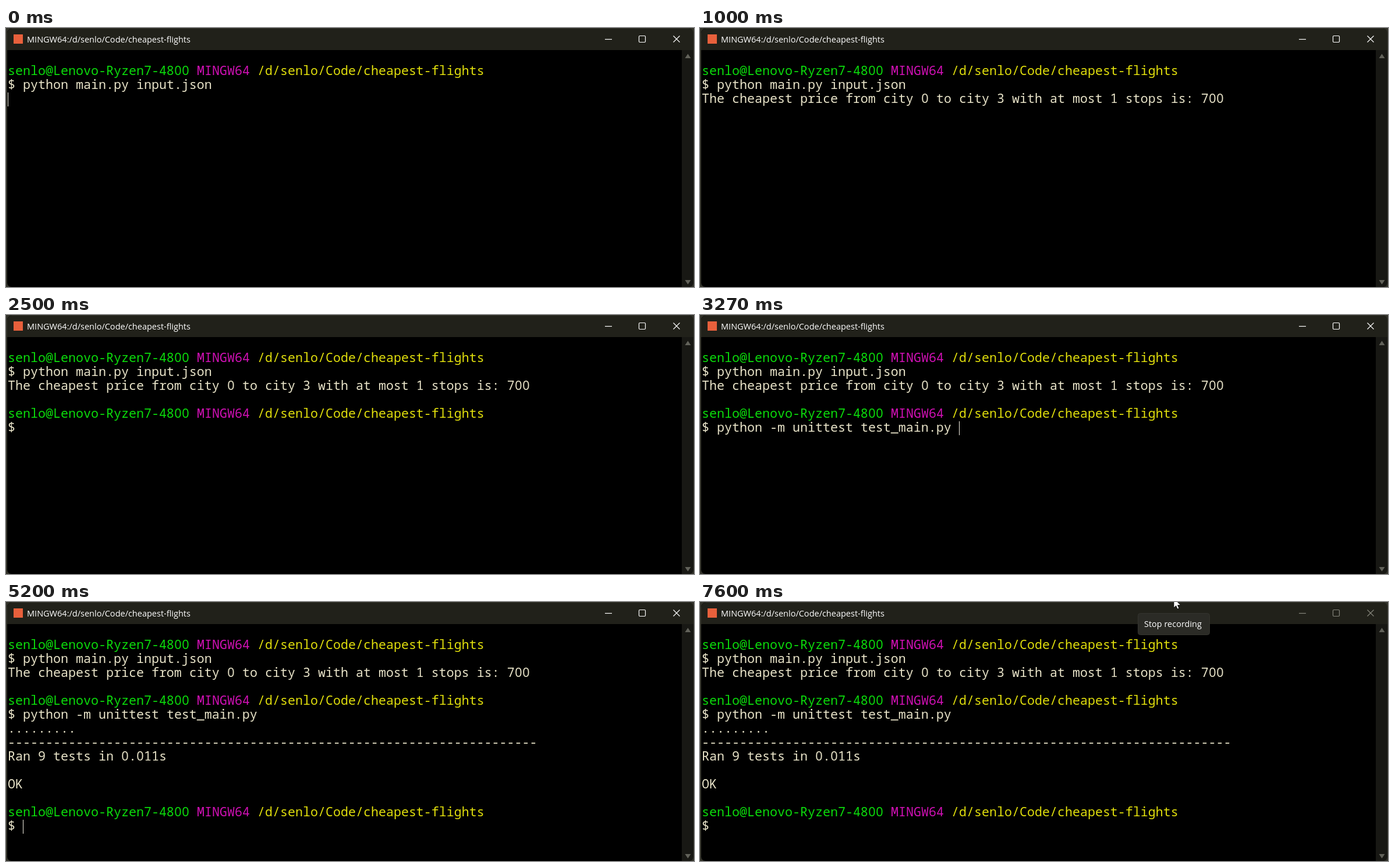
An HTML page that plays this animation: 1182x446 px, repeating every 7.96 s.

```html
<!DOCTYPE html>
<html lang="en">
<head>
<meta charset="utf-8">
<title>Terminal</title>
<style>
html, body { margin: 0; width: 100%; height: 100%; overflow: hidden; background: #000; }
svg { display: block; }
text { white-space: pre; }
.term { font: 500 21.667px "Noto Sans Mono", monospace; }
.zero { font-family: "Noto Sans", sans-serif; }
.ui { font: 14.5px "Open Sans", sans-serif; fill: #fff; }
</style>
</head>
<body>
<svg width="1182" height="446" viewBox="0 0 1182 446">
  <rect width="1182" height="446" fill="#32322a"/>
  <rect x="1.5" y="0.5" width="1179.5" height="446" rx="8" fill="#000" stroke="#35352c"/>
  <path d="M2 38V9a8 8 0 0 1 8-8H1173a8 8 0 0 1 8 8V38Z" fill="#21211a"/>
  <path d="M1161 38H1181V438a8 8 0 0 1-8 8H1161Z" fill="#181814"/>
  <path d="M1166.5 52H1176.5L1171.5 44.5ZM1166.5 434H1176.5L1171.5 441.5Z" fill="#62625a"/>
  <rect x="13" y="11" width="16" height="16" fill="#e8603c"/>
  <text class="ui" x="36" y="25">MINGW64:/d/senlo/Code/cheapest-flights</text>
  <g id="controls" fill="none" stroke-width="1.2">
    <path d="M1029 19.5H1041"/>
    <rect x="1087.5" y="13.5" width="11" height="11" rx="1.5"/>
    <path d="M1146.5 13.5L1157.5 24.5M1157.5 13.5L1146.5 24.5"/>
  </g>
  <g id="screen" class="term"></g>
  <rect id="caret" width="1" height="24" fill="#f4f0e4"/>
  <g id="tip">
    <rect x="752.5" y="19.5" width="123" height="37" rx="4" fill="#2b2b26" stroke="#34342e"/>
    <text class="ui" x="763" y="43">Stop recording</text>
  </g>
  <path id="mouse" d="M0 0V16.5L3.8 13L6.2 18.6L9 17.4L6.6 12H11.8Z" fill="#fff" stroke="#000" stroke-width="0.8"/>
</svg>
<script>
const LOOP = 7960, CELL = 13, ROW = 24, LEFT = 3, TOP = 63;
const INK = { green: "#0bdc0b", pink: "#d010b4", yellow: "#e0de0c", cream: "#e8e3c8" };
const NS = "http://www.w3.org/2000/svg";
const get = id => document.getElementById(id);
const screen = get("screen"), caret = get("caret"), tip = get("tip");
const mouse = get("mouse"), controls = get("controls");

function add(parent, tag, attrs) {
  const el = document.createElementNS(NS, tag);
  for (const k in attrs) el.setAttribute(k, attrs[k]);
  return parent.appendChild(el);
}

// Plain zeros come from a proportional face, so runs are split around them.
function print(group, row, col, str, ink) {
  const line = add(group, "text", { y: TOP + ROW * row + 18, fill: INK[ink] });
  for (const run of str.matchAll(/0|[^0]+/g)) {
    const zero = run[0] === "0";
    const x = LEFT + CELL * (col + run.index) + (zero ? 0.3 : 0);
    add(line, "tspan", zero ? { x, class: "zero" } : { x }).textContent = run[0];
  }
}

function prompt(group, row) {
  print(group, row, 0, "senlo@Lenovo-Ryzen7-4800", "green");
  print(group, row, 25, "MINGW64", "pink");
  print(group, row, 33, "/d/senlo/Code/cheapest-flights", "yellow");
  print(group, row + 1, 0, "$", "cream");
}

const say = (row, str, col = 0) => g => print(g, row, col, str, "cream");
const ask = row => g => prompt(g, row);

const steps = [
  [0, ask(0), say(1, "python main.py input.json", 2)],
  [270, say(2, "The cheapest price from city 0 to city 3 with at most 1 stops is: 700")],
  [1670, ask(4)],
  [3270, say(5, "python -m unittest test_main.py", 2)],
  [4530, say(6, "........."), say(7, "-".repeat(70)),
    say(8, "Ran 9 tests in 0.011s"), say(10, "OK")],
  [5200, ask(12)]
].map(([at, ...parts]) => {
  const group = add(screen, "g", {});
  parts.forEach(draw => draw(group));
  return { at, group };
});

// Caret: from, to, row, column
const carets = [
  [0, 270, 2, 0], [270, 800, 3, 0], [1330, 1670, 3, 0],
  [1670, 2300, 5, 2], [3270, 4200, 5, 34], [4200, 4530, 6, 0],
  [5200, 5670, 13, 2], [6000, 6670, 13, 2], [7470, 7570, 13, 2]
];

// Pointer: time, x, y
const path = [[6430, 808, -19], [6670, 811, -8.5], [6770, 814, -6.5]];

function along(t) {
  let i = 0;
  while (i < path.length - 2 && t > path[i + 1][0]) i++;
  const [a, b] = [path[i], path[i + 1]];
  const k = Math.max(0, Math.min(1, (t - a[0]) / (b[0] - a[0])));
  return [1, 2].map(n => a[n] + (b[n] - a[n]) * k);
}

const show = (el, on) => el.setAttribute("visibility", on ? "visible" : "hidden");

function render(t) {
  for (const s of steps) show(s.group, t >= s.at);
  const c = carets.find(([from, to]) => t >= from && t < to);
  show(caret, c);
  if (c) {
    caret.setAttribute("x", LEFT + CELL * c[3]);
    caret.setAttribute("y", TOP + ROW * c[2]);
  }
  show(mouse, t >= path[0][0]);
  mouse.setAttribute("transform", `translate(${along(t)})`);
  controls.setAttribute("stroke", t < 7500 ? "#fff" : "#86867c");
  tip.setAttribute("opacity", Math.max(0, Math.min(1, (t - 7450) / 120)));
}

const start = performance.now();
function frame(now) {
  render(Math.max(0, now - start) % LOOP);
  requestAnimationFrame(frame);
}
render(0);
requestAnimationFrame(frame);
</script>
</body>
</html>
```
